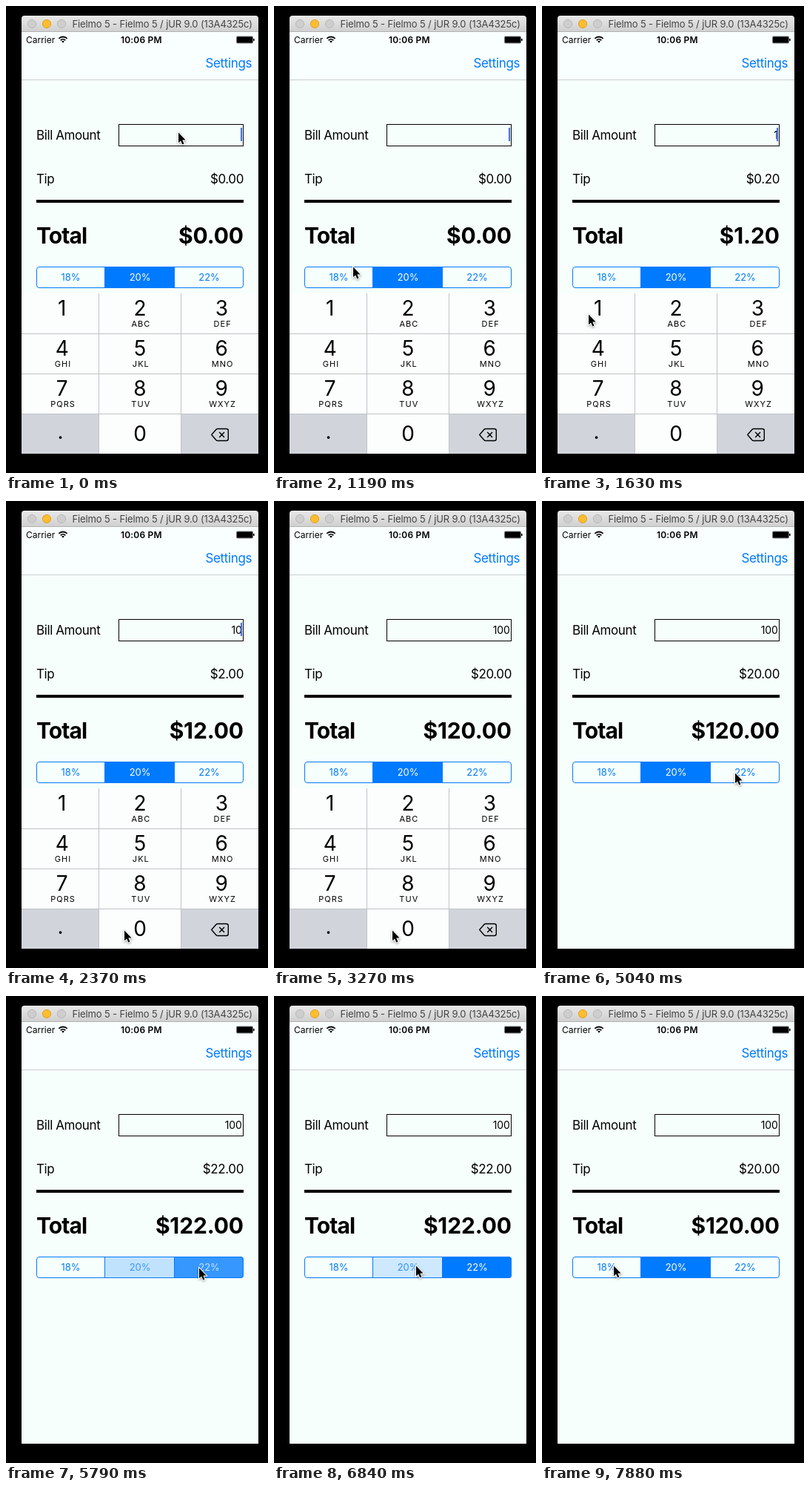
Animation of 354 by 629 pixels, one loop 8000 ms. Source, as an HTML page with a canvas:

```html
<!DOCTYPE html>
<html lang="en">
<head>
<meta charset="utf-8">
<title>Tip calculator</title>
<style>
html, body { margin: 0; width: 354px; height: 629px; overflow: hidden; background: #000; }
canvas { display: block; }
</style>
</head>
<body>
<canvas id="stage" width="354" height="629"></canvas>
<script>
const ctx = document.getElementById('stage').getContext('2d');
const LOOP = 8000, TICK = 148.4, TRAVEL = 3;
const BLUE = '#007aff', PAGE = '#f7fffc', KEY = '#fcfefe', GREY = '#d1d5db', LINE = '#bfc3c6';
const RATES = [0.18, 0.2, 0.22];
const LETTERS = { 2: 'ABC', 3: 'DEF', 4: 'GHI', 5: 'JKL', 6: 'MNO', 7: 'PQRS', 8: 'TUV', 9: 'WXYZ' };

// The pointer leaves for each spot at tick `move` and presses at tick `down`;
// everything else on screen follows from these taps.
const TAPS = [
  { move: 6, down: 10, x: 63, y: 415, key: '1' },
  { move: 11, down: 15, x: 160, y: 578, key: '0' },
  { move: 16, down: 17, x: 160, y: 578, key: '0' },
  { move: 24, down: 28, x: 204, y: 239, page: true },
  { move: 29, down: 37, x: 261, y: 366, segment: 2 },
  { move: 39, down: 45, x: 192, y: 363, segment: 1 },
  { move: 49, down: 60, x: 97, y: 363, segment: 0 }
];
const KEY_TAPS = TAPS.filter(t => t.key);
const SEGMENT_TAPS = TAPS.filter(t => 'segment' in t);
const PAGE_TAP = TAPS.find(t => t.page);

const clamp = v => Math.min(1, Math.max(0, v));
const smooth = u => u * u * (3 - 2 * u);
const money = v => '$' + v.toFixed(2);

function segmentFills(n) {
  const fills = [0, 1, 0];
  for (const { down, segment } of SEGMENT_TAPS) {
    const age = n - down;
    if (age < 0) continue;
    const tint = Math.min(0.17, 0.09 * (age + 1));
    const fade = clamp(age - 1.22);
    fills.forEach((f, i) => fills[i] = f * (1 - fade));
    fills[segment] = Math.max(tint, fade);
  }
  return fills;
}

function caretAlpha(n, lastEdit) {
  if (n >= PAGE_TAP.down) return 0;
  return clamp((Math.abs((n - lastEdit) % 8 - 5) - 1) / 2);
}

function text(str, x, y, size, { color = '#000', weight = 400, align = 'left', gap = 0 } = {}) {
  ctx.font = `${weight} ${size}px Inter, "Liberation Sans", sans-serif`;
  ctx.letterSpacing = gap + 'px';
  ctx.textAlign = align;
  ctx.fillStyle = color;
  ctx.fillText(str, x, y);
}

function rect(x, y, w, h, color) {
  ctx.fillStyle = color;
  ctx.fillRect(x, y, w, h);
}

function rounded(x, y, w, h, r) {
  ctx.beginPath();
  ctx.roundRect(x, y, w, h, r);
}

function poly(points) {
  ctx.beginPath();
  points.forEach(p => ctx.lineTo(...p));
  ctx.closePath();
}

function titleBar() {
  const shade = ctx.createLinearGradient(0, 13, 0, 35);
  shade.addColorStop(0, '#e9e8e9');
  shade.addColorStop(1, '#d0cfd0');
  rounded(21, 13, 320, 22, [4, 4, 0, 0]);
  ctx.fillStyle = shade;
  ctx.fill();
  rect(21, 34, 320, 1, '#b4b3b4');
  ctx.lineWidth = 1;
  for (let i = 0; i < 3; i++) {
    ctx.beginPath();
    ctx.arc(35 + 20 * i, 24, 5.6, 0, 7);
    ctx.fillStyle = i === 1 ? '#fdbd2e' : '#cfcecf';
    ctx.strokeStyle = i === 1 ? '#e0a028' : '#b9b8b9';
    ctx.fill();
    ctx.stroke();
  }
  text('Fielmo 5 - Fielmo 5 / jUR 9.0 (13A4325c)', 89.5, 29, 13, { color: '#444', gap: -0.13 });
}

function statusBar() {
  text('Carrier', 27, 49.5, 12);
  text('10:06 PM', 182.8, 49.5, 12, { weight: 600, align: 'center', gap: 0.2 });
  ctx.strokeStyle = '#000';
  ctx.lineWidth = 1.8;
  for (const r of [4.6, 8]) {
    ctx.beginPath();
    ctx.arc(77, 49.5, r, -Math.PI * 0.75, -Math.PI * 0.25);
    ctx.stroke();
  }
  poly([[77, 49.7], [75.1, 47.6], [77, 46.8], [78.9, 47.6]]);
  ctx.fillStyle = '#000';
  ctx.fill();
  rounded(311, 40.5, 23, 10, 2);
  ctx.fillStyle = 'rgba(0, 0, 0, 0.5)';
  ctx.fill();
  rect(312, 41.5, 21, 8, '#000');
  rounded(334, 43.8, 1.6, 3.4, 0.8);
  ctx.fill();
}

function form(n) {
  const typed = KEY_TAPS.filter(t => n > t.down);
  const bill = Number(typed.map(t => t.key).join(''));
  const lastEdit = typed.length ? typed.at(-1).down + 1 : -1;
  const chosen = SEGMENT_TAPS.filter(t => n >= t.down + 2).pop();
  const tip = bill * RATES[chosen ? chosen.segment : 1];

  text('Settings', 269.5, 83, 17, { color: BLUE, gap: -0.35 });
  rect(21, 99, 320, 1, '#c9cfce');

  text('Bill Amount', 41, 179.5, 17, { gap: -0.4 });
  ctx.strokeStyle = '#000';
  ctx.lineWidth = 1;
  ctx.strokeRect(152.5, 159.5, 168, 29);
  if (bill) text(String(bill), 318.8, 179, 14, { align: 'right', gap: -0.1 });
  ctx.globalAlpha = caretAlpha(n, lastEdit);
  rect(317, 164, 2, 18, '#3f6bdc');
  ctx.globalAlpha = 1;

  text('Tip', 41, 238.5, 17, { gap: -0.4 });
  text(money(tip), 321, 238.5, 17, { align: 'right', gap: -0.4 });
  rect(41, 261, 280, 4, '#000');
  text('Total', 41, 320, 30, { weight: 700, gap: -0.9 });
  text(money(bill + tip), 320.8, 320, 30, { weight: 700, align: 'right', gap: -0.15 });
}

function segments(n) {
  const fills = segmentFills(n), edges = [41, 133, 228, 321];
  ctx.save();
  rounded(41, 351, 280, 29, 4);
  ctx.clip();
  fills.forEach((a, i) => {
    ctx.globalAlpha = a;
    rect(edges[i], 351, edges[i + 1] - edges[i], 29, BLUE);
  });
  ctx.restore();
  ctx.strokeStyle = BLUE;
  ctx.lineWidth = 1;
  rounded(41.5, 351.5, 279, 28, 3.5);
  ctx.stroke();
  rect(133, 351, 1, 29, BLUE);
  rect(227, 351, 1, 29, BLUE);
  fills.forEach((a, i) => {
    const color = `rgb(${255 * a}, ${122 + 133 * a}, 255)`;
    text(RATES[i] * 100 + '%', 87.5 + 93.5 * i, 370.3, 13, { color, align: 'center', gap: -0.1 });
  });
}

function backspace(y) {
  ctx.strokeStyle = '#000';
  ctx.lineWidth = 1.4;
  ctx.lineJoin = 'round';
  ctx.beginPath();
  ctx.moveTo(277.7, y);
  ctx.lineTo(284, y - 7.2);
  ctx.quadraticCurveTo(284.7, y - 8, 286, y - 8);
  ctx.arcTo(300.3, y - 8, 300.3, y, 2.5);
  ctx.arcTo(300.3, y + 8, 290, y + 8, 2.5);
  ctx.lineTo(286, y + 8);
  ctx.quadraticCurveTo(284.7, y + 8, 284, y + 7.2);
  ctx.closePath();
  for (const s of [-1, 1]) {
    ctx.moveTo(288.2, y + 3.4 * s);
    ctx.lineTo(295, y - 3.4 * s);
  }
  ctx.stroke();
}

// A critically damped spring slides the keyboard out
function keyboardTop(n) {
  const a = Math.max(0, n - PAGE_TAP.down) * TICK / 1000 * 17.5;
  return 387 + Math.round(216 * (1 - (1 + a) * Math.exp(-a)));
}

function keyboard(n) {
  const top = keyboardTop(n);
  if (top >= 603) return;
  const edges = [21, 126, 237, 342], mids = [75.7, 181, 291.3];
  const pressed = KEY_TAPS.find(t => t.down === n)?.key;
  ctx.save();
  ctx.beginPath();
  ctx.rect(21, 35, 320, 568);
  ctx.clip();
  [...'123456789.0<'].forEach((key, i) => {
    const c = i % 3, row = Math.floor(i / 3), y = top + 54 * row;
    const grey = key === '.' || key === '<' || key === pressed;
    rect(edges[c], y, edges[c + 1] - edges[c], 54, grey ? GREY : KEY);
    if (key === '<') backspace(y + 28.5);
    else if (key === '.') text(key, 73.5, y + 34, 28, { align: 'center' });
    else text(key, mids[c], y + (row < 3 ? 30 : 37), 28, { align: 'center' });
    if (LETTERS[key]) text(LETTERS[key], mids[c] + 1.3, y + 45, 11, { align: 'center', gap: 1 });
  });
  for (let r = 1; r < 4; r++) rect(21, top + 54 * r, 320, 1, LINE);
  rect(125, top, 1, 216, LINE);
  rect(236, top, 1, 216, LINE);
  ctx.restore();
}

function pointer(n) {
  let x = 233, y = 170;
  for (const tap of TAPS) {
    const s = smooth(clamp((n - tap.move) / TRAVEL));
    x += (tap.x - x) * s;
    y += (tap.y - y) * s;
  }
  ctx.save();
  ctx.translate(Math.round(x), Math.round(y) + 0.5);
  poly([[0, 0], [0, 13.8], [3.1, 10.9], [5.3, 15.9], [7.5, 15], [5.3, 10], [9.6, 10]]);
  ctx.lineJoin = 'miter';
  ctx.lineWidth = 2;
  ctx.strokeStyle = '#fff';
  ctx.shadowColor = 'rgba(0, 0, 0, 0.4)';
  ctx.shadowBlur = 3;
  ctx.shadowOffsetY = 1;
  ctx.stroke();
  ctx.shadowColor = 'transparent';
  ctx.fillStyle = '#000';
  ctx.fill();
  ctx.restore();
}

function draw(now) {
  const n = Math.floor((now % LOOP + 8) / TICK);
  rect(0, 0, 354, 629, '#000');
  titleBar();
  rect(21, 35, 320, 568, PAGE);
  rect(21, 35, 320, 64, '#f9fffe');
  statusBar();
  form(n);
  segments(n);
  keyboard(n);
  pointer(n);
}

let start;
function loop(now) {
  start ??= now;
  draw(Math.max(0, now - start));
  requestAnimationFrame(loop);
}
draw(0);
requestAnimationFrame(loop);
</script>
</body>
</html>
```
